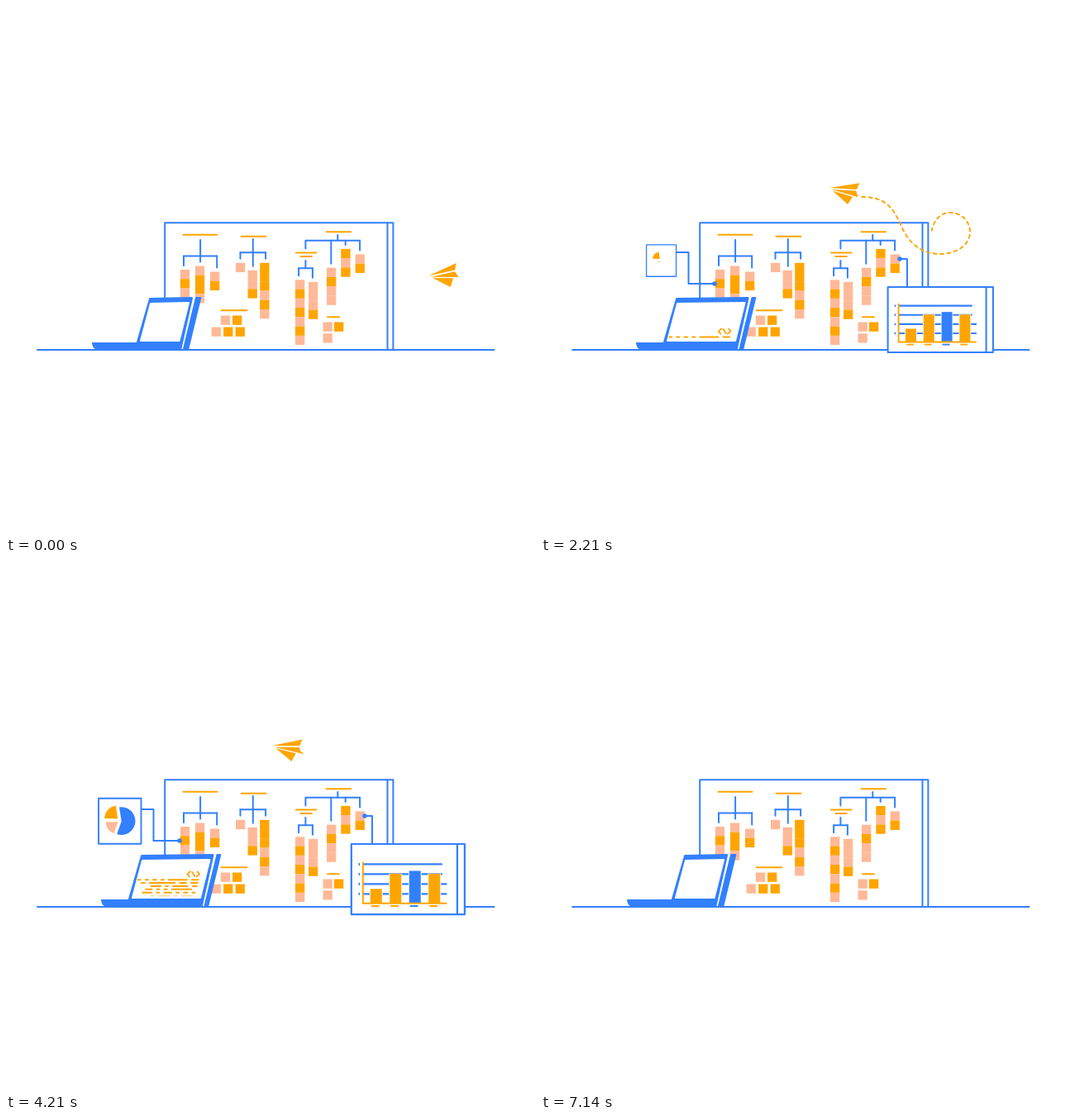
An HTML page with a canvas for the animation above (7.21 s loop, 640 by 640 pixels).

```html
<!DOCTYPE html>
<html lang="en">
<head>
<meta charset="utf-8">
<title>Workspace</title>
<style>
html, body { margin: 0; width: 100%; height: 100%; overflow: hidden; background: #fff; }
canvas { display: block; width: 640px; height: 640px; }
</style>
</head>
<body>
<canvas id="stage" width="640" height="640"></canvas>
<script>
const ctx = document.getElementById('stage').getContext('2d');
const BLUE = '#3380ff', ORANGE = '#ffa500', PINK = '#ffb998', WHITE = '#fff';
const LOOP = 7210, STEP = 1000 / 14, NOTE = 11.25;

// Timing helpers
const clamp = v => Math.max(0, Math.min(1, v));
const part = (t, a, b) => clamp((t - a) / (b - a));
const smooth = (t, a, b) => { const p = part(t, a, b); return p * p * (3 - 2 * p); };
const show = (t, in0, in1, out0, out1) => smooth(t, in0, in1) * (1 - smooth(t, out0, out1));
const overshoot = p => 1 + 3.75 * (p - 1) ** 3 + 2.75 * (p - 1) ** 2;
const pop = (t, in0, in1, out0, out1) =>
  overshoot(t < out0 ? part(t, in0, in1) : 1 - part(t, out0, out1));
const rad = deg => deg * Math.PI / 180;

function seeded(seed) {
  return () => (seed = (seed * 16807) % 2147483647) / 2147483647;
}

// Drawing helpers
function trace(pts) {
  ctx.beginPath();
  for (let i = 0; i < pts.length; i += 2) ctx.lineTo(pts[i], pts[i + 1]);
}
function line(color, width, ...pts) {
  trace(pts);
  ctx.strokeStyle = color;
  ctx.lineWidth = width;
  ctx.stroke();
}
function poly(color, pts, edge = 0) {
  trace(pts);
  ctx.closePath();
  ctx.fillStyle = color;
  ctx.fill();
  if (edge) {
    ctx.strokeStyle = color;
    ctx.lineWidth = edge;
    ctx.stroke();
  }
}
function rect(color, x, y, w, h) {
  ctx.fillStyle = color;
  ctx.fillRect(x, y, w, h);
}
function dot(x, y, r) {
  ctx.fillStyle = BLUE;
  ctx.beginPath();
  ctx.arc(x, y, r, 0, 7);
  ctx.fill();
}
function box(x, y, w, h) {
  rect(WHITE, x, y, w, h);
  ctx.strokeStyle = BLUE;
  ctx.lineWidth = 2;
  ctx.strokeRect(x, y, w, h);
}
function scaled(x, y, s, draw) {
  if (s < 0.01) return;
  ctx.save();
  ctx.translate(x, y);
  ctx.scale(s, s);
  draw();
  ctx.restore();
}

// Whiteboard; notes are written as p = pink, o = orange.
function notes(x, y, dx, dy, kinds) {
  [...kinds].forEach((k, i) => rect(k === 'o' ? ORANGE : PINK, x + i * dx, y + i * dy, 11.3, 11.3));
}
function title(x, y, width) {
  line(ORANGE, 2, x - width / 2, y, x + width / 2, y);
}
// A stem, a crossbar and one column of notes under each drop.
function tree(stemX, stemY, barY, x, gap, noteX, noteGap, columns) {
  line(BLUE, 2, stemX, stemY, stemX, barY);
  line(BLUE, 2, x, barY, x + gap * (columns.length - 1), barY);
  columns.forEach(([top, kinds], i) => {
    line(BLUE, 2, x + i * gap, barY, x + i * gap, top - 5);
    notes(noteX + i * noteGap, top, 0, NOTE, kinds);
  });
}

function drawBoard() {
  line(BLUE, 2, 38, 416, 590.5, 416);
  line(BLUE, 2, 192.2, 416, 192.2, 262.3, 468.4, 262.3, 468.4, 416);
  line(BLUE, 2, 461.5, 262.3, 461.5, 416);

  title(235, 276.8, 41);
  tree(235.1, 283, 302.5, 215, 20.1, 210.8, 18.1, [[319, 'pop'], [314.5, 'poop'], [321.5, 'po']]);
  title(299.5, 278.8, 30);
  tree(298.8, 282, 298.2, 283.5, 15.3, 278, 14.6, [[310.8, 'p'], [319.8, 'ppo'], [310.8, 'ooopop']]);
  title(402.3, 273.2, 29.5);
  tree(401.3, 277, 283.8, 393.3, 17.4, 388, 17.3, [[316.7, 'popp'], [293.9, 'opo'], [300.4, 'po']]);
  line(BLUE, 2, 393.3, 283.8, 362.4, 283.8, 362.4, 293.5);
  title(363.2, 298.5, 24.5);
  title(363.2, 303, 13.5);
  tree(362.4, 308, 317.3, 354.1, 16.8, 350, 16, [[331.3, 'popopop'], [333.8, 'pppo']]);

  title(276, 368.2, 31);
  notes(259.8, 374.5, 14.2, 0, 'po');
  notes(248.6, 388.5, 14.5, 0, 'poo');
  title(396, 376.3, 14);
  notes(383.5, 382.5, 13.5, 0, 'po');
  notes(383.5, 396.2, 0, 0, 'p');
}

// Connectors
function wire(amount, length, ...pts) {
  if (amount <= 0) return;
  ctx.setLineDash([amount * length, 999]);
  ctx.lineCap = 'butt';
  line(BLUE, 2, ...pts);
  ctx.setLineDash([]);
  ctx.lineCap = 'round';
}
function drawConnectors(t) {
  wire(show(t, 820, 1140, 5480, 5950), 43, 434, 306, 443, 306, 443, 340);
  wire(show(t, 1270, 2000, 6050, 6640), 85, 210, 336, 178.5, 336, 178.5, 298, 163.5, 298);
  dot(434, 306, 2.8 * show(t, 700, 920, 5750, 6060));
  dot(210, 336, 2.8 * show(t, 1060, 1300, 6500, 6700));
}

// Panels; both breathe with the same slow pulse.
const pulse = t => show(t, 2250, 2850, 3400, 4050);

function drawChart(t) {
  const grow = show(t, 1230, 1900, 4750, 5300), base = 63.5;
  const barHeights = [15, 31.5, 34.5 + 14.5 * pulse(t), 31.5];
  scaled(443, 340, pop(t, 1155, 2375, 3800, 5400), () => {
    box(-22.5, 0, 122.5, 76);
    line(BLUE, 2, 92, 0, 92, 76);
    for (let i = 0; i < 4; i++) {
      const y = 21.8 + i * 10.7, end = i < 2 ? 75 + 5 * pulse(t) : 80;
      line(BLUE, 1.5, -14, y - 0.7, -14, y + 0.7);
      if (grow > 0) line(BLUE, 2, -9, y, -9 + (end + 9) * grow, y);
    }
    barHeights.forEach((full, i) => {
      const x = -2 + i * 21, h = full * grow, color = i === 2 ? BLUE : ORANGE;
      rect(WHITE, x - 0.8, base - h, 14.1, h);
      rect(color, x, base - h, 12.5, h);
      line(color, 1.6, x + 1.5, 67, x + 1.5 + 7.5 * grow, 67);
    });
    if (grow > 0) {
      line(ORANGE, 1.8, -10, 64 - (44 + 10 * pulse(t)) * grow, -10, 64, -10 + 90 * grow, 64);
    }
  });
}

// color, tip, start and end angle, resting radius, extra radius on the pulse
const slices = [
  [ORANGE, -30, 11.8, 182, 262, 17, 1],
  [PINK, -29.5, 15.7, 110, 180, 15.8, 2.2],
  [BLUE, -25.2, 14.7, -99, 109, 17.8, 3.2]
];

function drawPie(t) {
  scaled(163.5, 298.3, 0.945 * pop(t, 2053, 3100, 4400, 6000), () => {
    box(-54.5, -14.3, 54.5, 58.2);
    slices.forEach(([color, x, y, from, to, rest, extra], i) => {
      const start = 2000 + i * 120;
      const r = (rest + extra * pulse(t)) * show(t, start, start + 310, 5150, 5700);
      ctx.fillStyle = color;
      ctx.beginPath();
      ctx.moveTo(x, y);
      ctx.arc(x, y, r, rad(from), rad(to));
      ctx.fill();
    });
  });
}

// Laptop
function drawCode(t, screen) {
  const alpha = show(t, 1400, 1700, 5580, 6120);
  if (alpha <= 0) return;
  const y = Math.max(367.5, 393.5 - (t - 2210) * 0.0086);
  const random = seeded(77);
  ctx.save();
  trace(screen);
  ctx.clip();
  ctx.translate(229 - (y - 367.5) * 0.265, y);
  ctx.globalAlpha = alpha;
  line(ORANGE, 1.8, -4, -3.1, -7.3, 0.3, -4.8, 3.1);
  line(ORANGE, 1.8, -1.7, -2.5, 1.7, 2.6);
  line(ORANGE, 1.8, 5, -2.9, 7.4, 0.2, 3.8, 3.1);
  for (let row = 0; row < 7; row++) {
    const dy = 7 + row * 3.85, right = 7 - row;
    ctx.globalAlpha = alpha * clamp((403 - y - dy) / 1.4);
    let x = -68 + random() * 16;
    while (x < right - 3) {
      const end = Math.min(right, x + 5 + 30 * random() ** 3);
      line(ORANGE, 2, x + 1, dy, end - 1, dy);
      x = end + 4;
    }
  }
  ctx.restore();
}

function drawLaptop(t) {
  const open = show(t, 0, 1080, 5990, 7160);
  const l = -10 * open, r = 25.5 * open, foot = 104 + 11 * open;
  const lid = [174.5 + l, 354.5, 224.5 + r, 353.5, 211 + r, 414.2, 158.8 + l, 409];
  const screen = [175 + l, 360, 221 + r, 359, 209.5 + r, 405, 163 + l, 405];
  poly(WHITE, [224 + r, 353, 230 + r, 353, 215 + r, 415, 211 + r, 415]);
  poly(BLUE, [230 + r, 353, 235.3 + r * 0.94, 353, 220.3 + r * 0.94, 415, 215 + r, 415], 2);
  poly(BLUE, lid, 3);
  ctx.beginPath();
  ctx.moveTo(foot, 407);
  ctx.lineTo(212 + r, 407);
  ctx.lineTo(212 + r, 415.8);
  ctx.lineTo(foot + 6, 415.8);
  ctx.quadraticCurveTo(foot, 414.5, foot, 407);
  ctx.fill();
  poly(WHITE, screen, 2);
  drawCode(t, screen);
}

// Paper plane: a loop, a hover above the board, then a dive behind it.
const route = document.createElementNS('http://www.w3.org/2000/svg', 'path');
route.setAttribute('d', 'M548 327.3C540 327.3 532 327.3 525 327C500 325 472 312 472 280C472 263 481 250 495 250' +
  'C508 250 519 260 519 273C519 290 502 300 482 300C455 299 443 283 434 262C425 243 416 231 388 231' +
  'C370 229.5 335 230 318 230.5C300 232 265 235 255 262C250 280 250 300 250 420');
const HOVER = 387;
const planeAt = t => HOVER * (1 - (1 - part(t, 0, 2450)) ** 1.15) + 250 * part(t, 4600, 5600) ** 2;
const trailFrom = t => 24 + (HOVER - 24) * smooth(t, 1250, 4300) + 135 * part(t, 5000, 6140) ** 2;

function drawTrail(from, to) {
  if (to <= from) return;
  const pts = [];
  for (let s = from; s < to + 2; s += 2) {
    const p = route.getPointAtLength(Math.min(s, to));
    pts.push(p.x, p.y);
  }
  ctx.setLineDash([4, 4.4]);
  ctx.lineDashOffset = from;
  line(ORANGE, 1.9, ...pts);
  ctx.setLineDash([]);
}

function drawPlane(t) {
  const at = planeAt(t);
  ctx.save();
  if (t > 4400) {
    ctx.beginPath();
    ctx.rect(0, 0, 640, 262);
    ctx.clip();
  }
  drawTrail(trailFrom(t), at);
  const p = route.getPointAtLength(at), q = route.getPointAtLength(at + 8);
  ctx.translate(p.x, p.y);
  ctx.rotate(Math.atan2(p.y - q.y, p.x - q.x) + rad(13 * show(t, 1250, 2100, 4600, 5100)));
  ctx.scale(1, 1 - 0.28 * show(t, 0, 800, 1210, 2000));
  ctx.rotate(rad(-13));
  ctx.translate(-36, -9);
  poly(ORANGE, [0, 0, 36.5, -7.5, 33, 0.3]);
  poly(ORANGE, [3, 1.8, 32.5, 2, 35.5, 9.5]);
  poly(ORANGE, [4.5, 3.4, 28.8, 9.3, 23.3, 19]);
  ctx.restore();
}

function draw(now) {
  const t = Math.floor((now % LOOP) / STEP + 0.07) * STEP;
  rect(WHITE, 0, 0, 640, 640);
  ctx.lineCap = ctx.lineJoin = 'round';
  drawBoard();
  drawConnectors(t);
  drawChart(t);
  drawPie(t);
  drawLaptop(t);
  drawPlane(t);
}

const start = performance.now();
function tick() {
  draw(performance.now() - start);
  requestAnimationFrame(tick);
}
tick();
</script>
</body>
</html>
```
